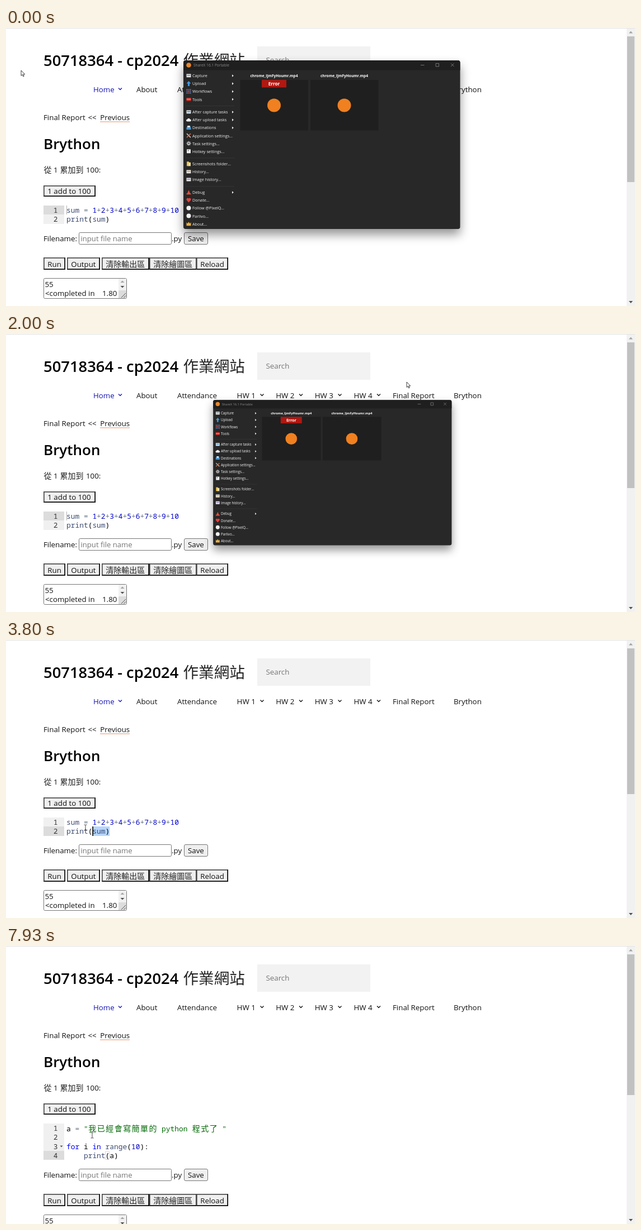
An HTML page for the animation above (8000 ms loop, 1124 px wide and 498 px high).

```html
<!DOCTYPE html>
<html lang="en">
<head>
<meta charset="utf-8">
<title>Brython editor</title>
<style>
  html, body { margin: 0; width: 100%; height: 100%; overflow: hidden; background: #fff; }
  svg { display: block; font: 13.3px "Open Sans", "Noto Sans CJK TC", "Noto Sans CJK", sans-serif; }
  text { white-space: pre; }
  .code { font: 12.88px "Noto Sans Mono", monospace; }
  .han { font-family: "Noto Sans CJK TC", "Noto Sans CJK", sans-serif; font-weight: 300; }
  .code .han { font-size: 14px; }
</style>
</head>
<body>
<svg id="stage" width="1124" height="498" viewBox="0 0 1124 498" xmlns="http://www.w3.org/2000/svg"></svg>
<script>
const LOOP = 8000, STEP = 200 / 3;
const CELL = 7.73, CODE_X = 108, CODE_Y = 318, ROW = 16.35;
const CLICK = 3530, PASTE = 7270;

// Markup helpers
const text = (x, y, str, size = 13.3, fill = '#111', more = '') =>
  `<text x="${x}" y="${y}" font-size="${size}" fill="${fill}" ${more}>${str.replace(/</g, '&lt;')}</text>`;
const han = (x, y, str, size = 14) => text(x, y, str, size, '#222', 'class="han"');
const box = (x1, y1, x2, y2, fill, more = '') =>
  `<rect x="${x1}" y="${y1}" width="${x2 - x1}" height="${y2 - y1}" fill="${fill}" ${more}/>`;
const line = (d, stroke, width = 1) =>
  `<path d="${d}" fill="none" stroke="${stroke}" stroke-width="${width}"/>`;
const shape = (d, fill) => `<path d="${d}" fill="${fill}"/>`;
const dot = (x, y, r, fill) => `<circle cx="${x}" cy="${y}" r="${r}" fill="${fill}"/>`;
const group = (id, content) => `<g id="${id}">${content}</g>`;
const chevron = x => `M${x - 3} 107.5l3 3 3-3`;
const triangle = (x, y, w, h, fill) => shape(`M${x - w} ${y}h${2 * w}l${-w} ${h}z`, fill);
const field = (x1, y1, x2, y2, fill, r) =>
  box(x1 + .5, y1 + .5, x2 - .5, y2 - .5, fill, `rx="${r}" stroke="#767676"`);

function outsetButton(x1, y1, x2, y2, label, write = text) {
  return box(x1, y1, x2, y2, '#000') +
    shape(`M${x1} ${y2}V${y1}H${x2}l-2 2H${x1 + 2}V${y2 - 2}z`, '#4c4c4c') +
    box(x1 + 1.7, y1 + 1.7, x2 - 1.7, y2 - 1.7, '#efefef') +
    write(x1 + 7.3, y2 - 5, label);
}

// Code text on a fixed character grid, wide characters take two cells
function codeLine(row, source, drop = 0) {
  const colors = [[/^"/, '#036a07'], [/^\d/, '#0000cd'], [/^(for|in)$/, '#0000ff'],
    [/^(sum|print|range)$/, '#3c4c72'], [/^[+=]/, '#687687']];
  let col = 0;
  return source.match(/"[^"]*"|\d+|\w+|./g).map(token => {
    const fill = (colors.find(([test]) => test.test(token)) || [0, '#000'])[1];
    const chars = [...token].map(ch => {
      const wide = ch > '\u2fff';
      const x = CODE_X + col * CELL + (wide ? .7 : 0);
      col += wide ? 2 : 1;
      return `<tspan x="${x.toFixed(2)}"${wide ? ' class="han"' : ''}>${ch}</tspan>`;
    });
    return `<text class="code" y="${CODE_Y + 13 + row * ROW + drop}" fill="${fill}">${chars.join('')}</text>`;
  }).join('');
}

const rowTop = row => Math.round(CODE_Y + row * ROW);
const gutter = (rows, active) =>
  box(67, CODE_Y, 104, rowTop(rows), '#f0f0f0') +
  box(67, rowTop(active), 104, rowTop(active + 1), '#dcdcdc') +
  Array.from({ length: rows }, (_, i) =>
    `<text class="code" x="92.5" y="${CODE_Y + 13 + i * ROW}" text-anchor="end" fill="#333">${i + 1}</text>`).join('');

function pageTop() {
  const nav = [[233, 'About'], [306, 'Attendance'], [691, 'Final Report'], [800, 'Brython']];
  [1, 2, 3, 4].forEach(n => nav.push([343 + n * 69.6, 'HW ' + n]));
  return box(0, 0, 1124, 1, '#e4e4e4') +
    text(67, 68, '50718364 - cp2024', 27.4, '#000', 'font-weight="600"') +
    han(316.5, 68, '作業網站', 27.6) +
    box(449, 33, 651, 82, '#f2f2f2') + text(464.5, 62, 'Search', 13.3, '#757575') +
    text(156, 115, 'Home', 13.3, '#1414b4') + line(chevron(204), '#1414b4', 1.3) +
    nav.map(([x, s]) => text(x, 115, s)).join('') +
    [457.5, 527, 596.5, 666].map(x => line(chevron(x), '#111', 1.3)).join('') +
    text(67, 164.5, 'Final Report') + text(146.5, 164.5, '<<') + text(168.3, 164.5, 'Previous') +
    box(168, 167.5, 221, 168.5, '#f08a5d') +
    text(67, 217, 'Brython', 26, '#000', 'font-weight="600"') +
    han(67.5, 259, '從') + text(85, 259, '1') + han(96.5, 259, '累加到') + text(143, 259, '100:') +
    outsetButton(67, 282, 160, 302, '1 add to 100');
}

function pageBottom() {
  return text(67, 382, 'Filename:') + field(130, 366, 296, 388, '#fff', 2) +
    text(133.5, 382, 'input file name', 13.1, '#757575') + text(296, 382, '.py') +
    field(318, 366, 361, 388, '#efefef', 2.5) + text(325, 382, 'Save') +
    outsetButton(67, 411, 106, 433, 'Run') + outsetButton(109, 411, 168, 433, 'Output') +
    outsetButton(171, 411, 256, 433, '清除輸出區', han) + outsetButton(256, 411, 341, 433, '清除繪圖區', han) +
    outsetButton(340, 411, 397, 433, 'Reload') +
    field(67, 448, 216, 485, '#fff', 2) + box(201, 449, 215, 470, '#f1f1f1') + box(201, 470, 215, 484, '#dcdcdc') +
    triangle(208, 456, 3.5, -3.5, '#a3a3a3') + triangle(208, 462, 3.5, 3.5, '#505050') +
    line('M206 483l8-8M210.5 483l3.5-3.5', '#555') +
    text(69.5, 463.5, '55') + text(70, 479.5, '<completed in') + text(172, 479.5, '1.80');
}

// Icons live in a 9 x 9 box
const grid = [0, 1, 2, 3, 4, 5, 6, 7, 8].map(i =>
  box(i % 3 * 3 + .5, (i / 3 | 0) * 3 + .5, i % 3 * 3 + 2.5, (i / 3 | 0) * 3 + 2.5, i % 2 ? '#e04848' : '#3d8ee0')).join('');
const card = color => box(.5, 1.5, 8.5, 7.5, '#e8e8e8') + box(1.5, 3, 7.5, 5, color);
const menu = [
  [85.5, 'Capture', card('#8a949c'), 1],
  [99.6, 'Upload', shape('M4.5 0l4 4.5H6V9H3V4.5H.5z', '#3d9be9'), 1],
  [113.7, 'Workflows', grid, 1],
  [127.8, 'Tools', box(.5, 2, 8.5, 7.5, '#d8342c') + box(.5, 4.3, 8.5, 5, '#f0d0d0'), 1],
  [150.5, 'After capture tasks', card('#4a9ad4'), 1],
  [164.6, 'After upload tasks', shape('M2 7.5a2 2 0 0 1 0-4a2.7 2.7 0 0 1 5 0a2 2 0 0 1 0 4z', '#f0f0f0'), 1],
  [178.7, 'Destinations', shape('M2 1h5l1.5 4v3H.5V5z', '#4a9ad4') + box(2.5, 1, 6.5, 4, '#eee'), 1],
  [192.8, 'Application settings...', line('M1 1l7 7', '#b9c4cc', 1.5) + line('M8 1L1 8', '#e0663c', 1.5)],
  [206.9, 'Task settings...', line('M4.5 .5v8M.5 4.5h8M1.7 1.7l5.6 5.6M7.3 1.7L1.7 7.3', '#e0e0e0', 1.2) + dot(4.5, 4.5, 1.2, '#333')],
  [221, 'Hotkey settings...', box(1, 1, 8, 8, '#f0f0f0') + box(2.5, 2.5, 5, 4, '#777')],
  [243.5, 'Screenshots folder...', box(1, .5, 5, 8.5, '#f0c24b') + box(4, 2, 8, 8.5, '#e9dfa8')],
  [257.6, 'History...', card('#e8a33c')],
  [271.7, 'Image history...', card('#a08fc4')],
  [294.5, 'Debug', shape('M4.5 .5l2.5 6h1.5v2h-8v-2H2z', '#e0513a'), 1],
  [308.6, 'Donate...', shape('M4.5 8.5L.8 4.5a2.1 2.1 0 0 1 3.7-2.8a2.1 2.1 0 0 1 3.7 2.8z', '#e8403c')],
  [322.7, 'Follow @PixelQ...', dot(4.5, 4.5, 4, '#f0f0f0')],
  [336.8, 'Parlivo...', dot(4.5, 4.5, 4, '#f0f0f0')],
  [350.9, 'About...', shape('M.5 2l2 2 2-3 2 3 2-2v6h-8z', '#e8b04a')],
];

function thumbnail(x) {
  const mid = x + 60.5;
  return box(x, 93, x + 121.5, 183.5, '#1f1f1f') + dot(mid, 138.5, 12, '#f08020') +
    text(mid, 88, 'chrome_IjmFyHoumr.mp4', 6.6, '#fff', 'font-weight="700" text-anchor="middle"');
}

const captureWindow = () =>
  box(317, 58, 811.5, 360, '#282828', 'rx="4"') +
  shape('M317 75.5V62q0-4 4-4h486.500q4 0 4 4v13.500z', '#1f1f1f') +
  box(731, 58, 757.5, 75, '#303030', 'id="hover"') +
  dot(326.5, 66.5, 4.3, '#e8862c') +
  group('caption',
    `<text x="335" y="69" font-size="6.6" fill="currentColor">ShareX 16.1 Portable</text>` +
    line('M741 66.5h6.5M768 63.5h5.5v5.5h-5.5zM795 63.5l5.5 5.5m0-5.5l-5.5 5.5', 'currentColor', .8)) +
  menu.map(([y, label, icon, arrow]) => `<g transform="translate(322 ${y - 4.7})">${icon}</g>` +
    text(333, y + 2.7, label, 7.25, '#f0f0f0') +
    (arrow ? shape(`M404 ${y - 2.3}l2.8 2.3-2.8 2.3z`, '#f0f0f0') : '')).join('') +
  [139, 232.5, 283.5].map(y => box(321, y, 408, y + .8, '#383838')).join('') +
  thumbnail(418.5) + thumbnail(544) +
  box(457, 93, 501, 106.5, '#b01812') + text(479, 102.8, 'Error', 8.2, '#fff', 'font-weight="700" text-anchor="middle"');

const stage = document.getElementById('stage');
stage.innerHTML = pageTop() + group('editor', '') + group('bottom', pageBottom()) +
  box(1109, 1, 1124, 498, '#f1f1f1') + box(1110, 15, 1123, 276, '#c1c1c1', 'id="thumb"') +
  triangle(1116.5, 9.5, 3.5, -4, '#a3a3a3') + triangle(1116.5, 489, 3.5, 4, '#505050') +
  group('window', captureWindow()) +
  `<path id="arrow" d="M0 0v9.5l2.2-2 1.5 3.4 1.5-.7-1.5-3.2h3z" fill="#fff" stroke="#111" stroke-width=".8"/>` +
  `<path id="beam" d="M-2.5-5h2l.5.5.5-.5h2M0-4.5v9M-2.5 5h2l.5-.5.5.5h2" fill="none" stroke="#333" stroke-width=".9"/>`;
const $ = id => document.getElementById(id);

// Pointer stops: time, x, y
const pointerPath = [
  [0, 27, 76], [130, 23, 95], [270, 40, 200], [470, 190, 331], [670, 420, 285], [870, 553, 208],
  [1130, 655, 138], [1400, 738, 53], [1670, 743.5, 63], [1870, 743.5, 63], [2000, 716, 86],
  [2330, 430, 260], [2600, 256, 352], [2730, 255, 352], [3000, 190, 338], [3130, 156, 334],
  [3400, 188, 342], [3600, 188, 342], [3733, 154, 339], [3800, 142, 336], [4070, 116, 328],
  [4330, 111, 325], [5260, 111, 325], [5270, 108.5, 323], [6870, 108.5, 323],
  [6930, 109.5, 323], [7070, 110, 323], [7270, 110, 323], [7870, 154, 339], [8000, 154, 339],
];
function pointerAt(t) {
  const i = Math.max(1, pointerPath.findIndex(p => p[0] >= t));
  const [t0, x0, y0] = pointerPath[i - 1], [t1, x1, y1] = pointerPath[i];
  const k = (t - t0) / (t1 - t0);
  return [x0 + (x1 - x0) * k, y0 + (y1 - y0) * k];
}

const within = (t, ...spans) => spans.some(([from, to]) => t >= from && t < to);
const caret = (x, row, fill, width) => box(x, rowTop(row), x + width, rowTop(row + 1), fill);

function editorBefore(t) {
  const code = codeLine(0, 'sum = 1+2+3+4+5+6+7+8+9+10') + codeLine(1, 'print(sum)');
  if (t < CLICK) return gutter(2, 0) + code + caret(CODE_X, 0, '#b0b0b0', 1);
  // The selection trails the pointer by one step
  const [x, y] = pointerAt(Math.min(t, 4470) - STEP);
  const row = y < 334 ? 0 : 1;
  const col = t > 4300 ? 0 : Math.min(10, Math.max(0, Math.round((x - CODE_X) / CELL)));
  const caretX = CODE_X + col * CELL, endX = CODE_X + 10 * CELL, blue = '#b5d5ff';
  const selection = row
    ? box(caretX, rowTop(1), endX, rowTop(2), blue)
    : box(caretX, rowTop(0), 594, rowTop(1), blue) + box(CODE_X, rowTop(1), endX, rowTop(2), blue);
  const lit = within(t, [CLICK, 4930], [5400, 5930], [6330, 6870]);
  return gutter(2, row) + selection + code + (lit ? caret(caretX, row, '#000', 1.6) : '');
}

function editorAfter(t) {
  return gutter(4, 3) + triangle(99, 357.5, 2.5, 3, '#555') +
    codeLine(0, 'a = "我已經會寫簡單的 python 程式了 "', 1.3) +
    codeLine(2, 'for i in range(10):') + codeLine(3, '    print(a)') +
    box(177.5, 367.5, 184.5, 382.5, 'none', 'stroke="#d4d4d4" rx="1"') +
    (t < 7800 ? caret(CODE_X + 12 * CELL, 3, '#000', 1.6) : '');
}

// The window takes focus, then shrinks toward the bottom edge and fades
function drawWindow(t) {
  const active = within(t, [1800, 1930]);
  const shrink = .138 * (Math.max(0, t - 1870) / 130) ** 2;
  const win = $('window');
  win.style.display = t < 2130 ? '' : 'none';
  win.style.opacity = t > 2050 ? .3 : 1;
  win.style.filter = active
    ? 'drop-shadow(0 13px 11px rgba(0,0,0,.55))'
    : 'drop-shadow(0 10px 9px rgba(0,0,0,.42))';
  win.setAttribute('transform',
    `translate(${564 + 138 * shrink} ${208.5 + 286 * shrink}) scale(${1 - shrink}) translate(-564 -208.5)`);
  $('caption').style.color = active ? '#fff' : '#8a8a8a';
  $('hover').style.display = active ? '' : 'none';
}

function drawPointer(t) {
  const [x, y] = pointerAt(t);
  const beam = within(t, [2760, 5265], [7330, LOOP]);
  $('arrow').style.display = beam ? 'none' : '';
  $('beam').style.display = beam ? '' : 'none';
  $(beam ? 'beam' : 'arrow').setAttribute('transform', `translate(${x} ${y})`);
}

let lastStep = -1;
function frame(now) {
  const step = Math.floor((now % LOOP + 4) / STEP) % (LOOP / STEP);
  if (step !== lastStep) {
    lastStep = step;
    const t = Math.round(step * STEP / 10) * 10;
    const pasted = t >= PASTE;
    $('editor').innerHTML = pasted ? editorAfter(t) : editorBefore(t);
    $('bottom').setAttribute('transform', `translate(0 ${pasted ? 33 : 0})`);
    $('thumb').setAttribute('height', pasted ? 252 : 261);
    drawWindow(t);
    drawPointer(t);
  }
  requestAnimationFrame(frame);
}
requestAnimationFrame(frame);
</script>
</body>
</html>
```
